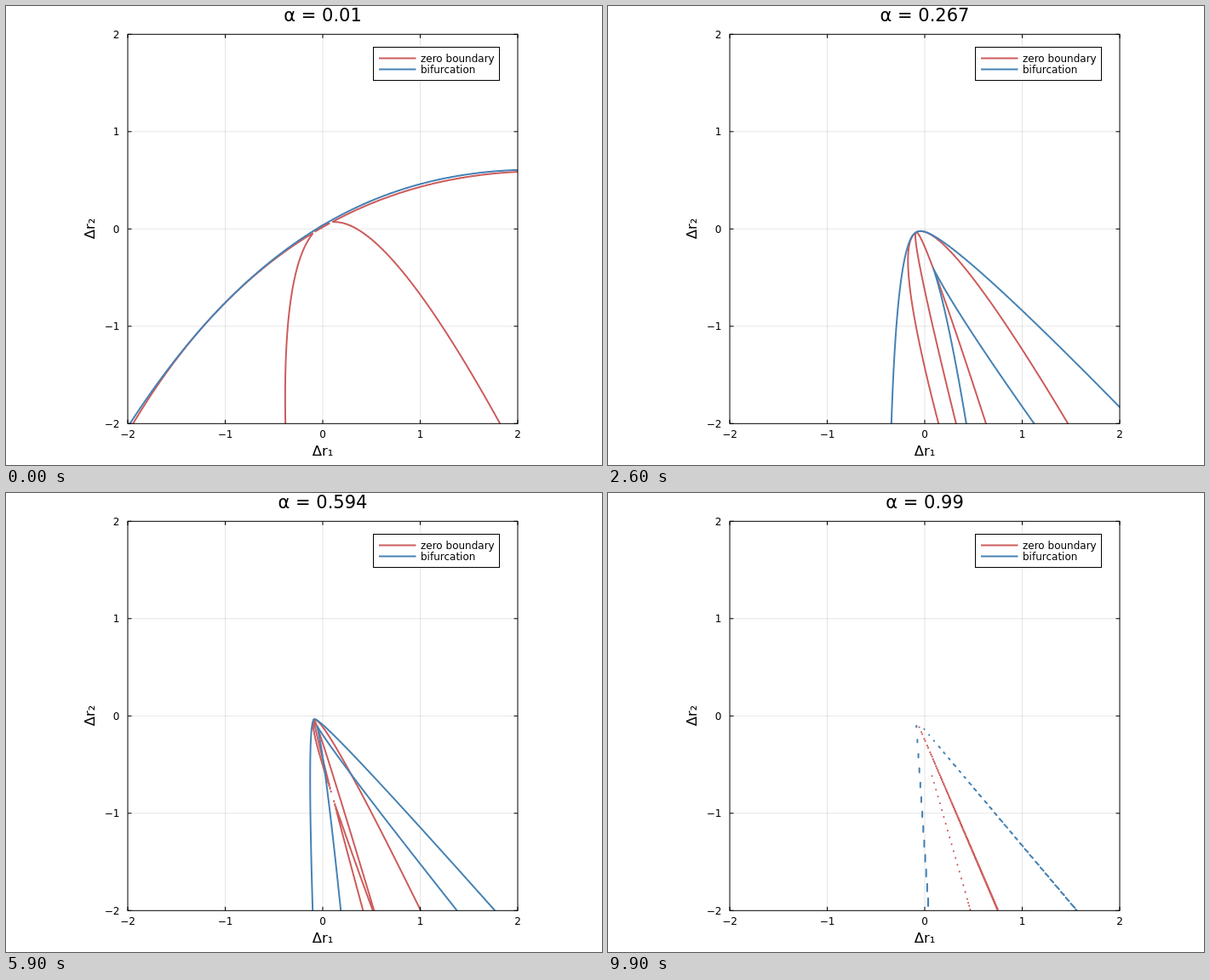
An HTML page with a canvas for the animation above (10000 ms loop, 700x540 px).

```html
<!DOCTYPE html>
<html lang="en">
<head>
<meta charset="utf-8">
<title>Bifurcation diagram</title>
<style>
html, body { margin: 0; width: 700px; height: 540px; overflow: hidden; background: #fff; }
canvas { display: block; }
</style>
</head>
<body>
<canvas id="plot" width="700" height="540"></canvas>
<script>
const ctx = document.getElementById('plot').getContext('2d');
const RED = '#cd5c5c', BLUE = '#4682b4';
const FRAMES = 100, STEP = 100;

// Plot area: data range -2..2 on both axes
const LEFT = 143, TOP = 33.3, SIZE = 458, UNIT = SIZE / 4;
const px = x => LEFT + (x + 2) * UNIT;
const py = y => TOP + (2 - y) * UNIT;

// Quadratic map: (x, y) = base + sigma * A u + B u^2, one parabola per variable
const base = { x: -0.09, y: -0.035 };
const wide = { ax: 0.2646, ay: 0.1601, b: 0.4285 };
const slim = { ax: 0.0586, ay: 0.0655, b: 0.285 };
const RAY1 = 0.0666, RAY2 = 0.84;   // slopes of the limiting fold rays

// Coefficients of the map in fold coordinates
const fold = (() => {
  const m1 = Math.sqrt(wide.b - RAY1), m2 = -Math.sqrt(slim.b - RAY1);
  const n1 = Math.sqrt(RAY2 - wide.b), n2 = Math.sqrt(RAY2 - slim.b);
  const det = m1 * n2 - m2 * n1;
  const lin1 = c => c.ax + RAY1 * c.ay;
  const lin2 = c => -(c.ax + RAY2 * c.ay);
  const a1 = (n2 * lin1(wide) - n1 * lin1(slim)) / det;
  const b1 = (m1 * lin1(slim) - m2 * lin1(wide)) / det;
  const a2 = (n2 * lin2(wide) - n1 * lin2(slim)) / det;
  const b2 = (m1 * lin2(slim) - m2 * lin2(wide)) / det;
  return {
    g: b1, h: a2,
    k1: -a1 * a1 / 4 - b1 * b2 / 2,
    k2: -b2 * b2 / 4 - a1 * a2 / 2
  };
})();

function parabola(c, s) {
  const k = c.ax + c.b * c.ay;
  return (dx, dy) => {
    const w = dx + c.b * dy;
    return k * k * s * dy - c.ay * k * s * w + w * w;
  };
}

function zeroField(s) {
  const f = parabola(wide, s), g = parabola(slim, s);
  return (dx, dy) => f(dx, dy) * g(dx, dy);
}

// Discriminant of the quartic for the equilibria
function foldField(s) {
  const gg = fold.g * fold.g * s, hh = fold.h * fold.h * s;
  const tail = 27 * gg * gg * hh * hh;
  return (dx, dy) => {
    const l1 = dx + RAY1 * dy - fold.k1 * s;
    const l2 = -RAY2 * dy - dx - fold.k2 * s;
    const p = -2 * l1, r = l1 * l1 - gg * l2;
    return 256 * r * l2 * l2 + hh * p * (144 * r - 4 * p * p) - tail;
  };
}

// Zero contour on a regular grid
const N = 400, H = 4 / (N - 1);
const grid = new Float64Array(N * N);

function contour(field, color) {
  for (let j = 0; j < N; j++)
    for (let i = 0; i < N; i++)
      grid[j * N + i] = field(-2 + i * H - base.x, -2 + j * H - base.y);

  ctx.beginPath();
  for (let j = 0; j < N - 1; j++) {
    for (let i = 0; i < N - 1; i++) {
      const o = j * N + i;
      const a = grid[o], b = grid[o + 1], c = grid[o + N + 1], d = grid[o + N];
      const pa = a > 0, pb = b > 0, pc = c > 0, pd = d > 0;
      if (pa === pb && pb === pc && pc === pd) continue;
      const pts = [];
      if (pa !== pb) pts.push([i + a / (a - b), j]);
      if (pb !== pc) pts.push([i + 1, j + b / (b - c)]);
      if (pc !== pd) pts.push([i + d / (d - c), j + 1]);
      if (pd !== pa) pts.push([i, j + a / (a - d)]);
      if (pts.length === 4 && (a + b + c + d > 0) !== pa) pts.unshift(pts.pop());
      pts.forEach(([u, v], n) => {
        const x = px(-2 + u * H), y = py(-2 + v * H);
        if (n % 2) ctx.lineTo(x, y); else ctx.moveTo(x, y);
      });
    }
  }
  ctx.strokeStyle = color;
  ctx.lineWidth = 2;
  ctx.lineCap = ctx.lineJoin = 'round';
  ctx.stroke();
}

function line(x1, y1, x2, y2, color, width) {
  ctx.strokeStyle = color;
  ctx.lineWidth = width;
  ctx.lineCap = 'butt';
  ctx.beginPath();
  ctx.moveTo(x1, y1);
  ctx.lineTo(x2, y2);
  ctx.stroke();
}

function text(str, x, y, size, align) {
  ctx.font = size + 'px "DejaVu Sans", sans-serif';
  ctx.textAlign = align;
  ctx.fillStyle = '#000';
  ctx.fillText(str, x, y);
}

function drawGrid() {
  for (let v = -1; v <= 1; v++) {
    line(px(v), TOP, px(v), TOP + SIZE, 'rgba(0,0,0,.1)', 1);
    line(LEFT, py(v), LEFT + SIZE, py(v), 'rgba(0,0,0,.1)', 1);
  }
}

function drawAxes() {
  const right = LEFT + SIZE, bottom = TOP + SIZE, tick = 4.5;
  ctx.lineJoin = 'miter';
  ctx.strokeStyle = '#000';
  ctx.lineWidth = 1;
  ctx.strokeRect(LEFT, TOP, SIZE, SIZE);
  for (let v = -2; v <= 2; v++) {
    const x = px(v), y = py(v), label = String(v).replace('-', '\u2212');
    line(x, bottom, x, bottom - tick, '#000', 1);
    line(x, TOP, x, TOP + tick, '#000', 1);
    line(LEFT, y, LEFT + tick, y, '#000', 1);
    line(right, y, right - tick, y, '#000', 1);
    text(label, x, 508, 12, 'center');
    text(label, 133.5, y + 4.4, 12, 'right');
  }
  text('Δr₁', 372, 529, 16.5, 'center');
  ctx.save();
  ctx.translate(103.5, 262);
  ctx.rotate(-Math.PI / 2);
  text('Δr₂', 0, 0, 16.5, 'center');
  ctx.restore();
}

function drawLegend() {
  ctx.fillStyle = '#fff';
  ctx.fillRect(431.5, 48.5, 148, 39);
  ctx.strokeStyle = '#000';
  ctx.lineWidth = 1;
  ctx.strokeRect(431.5, 48.5, 148, 39);
  line(438, 61.5, 481.5, 61.5, RED, 2);
  line(438, 74.5, 481.5, 74.5, BLUE, 2);
  text('zero boundary', 487, 66, 12, 'left');
  text('bifurcation', 487, 79, 12, 'left');
}

function draw(frame) {
  const alpha = 0.01 + 0.98 * frame / (FRAMES - 1);
  const s = (1 - alpha) ** 2 / alpha;
  ctx.fillStyle = '#fff';
  ctx.fillRect(0, 0, 700, 540);
  drawGrid();
  ctx.save();
  ctx.beginPath();
  ctx.rect(LEFT, TOP, SIZE, SIZE);
  ctx.clip();
  contour(zeroField(s), RED);
  contour(foldField(s), BLUE);
  ctx.restore();
  drawAxes();
  drawLegend();
  text('α = ' + Number(alpha.toFixed(3)), 372, 18.3, 21, 'center');
}

let shown = -1;
const start = performance.now();
function tick(now) {
  const frame = Math.floor(Math.max(0, now - start) / STEP) % FRAMES;
  if (frame !== shown) draw(shown = frame);
  requestAnimationFrame(tick);
}
draw(shown = 0);
requestAnimationFrame(tick);
</script>
</body>
</html>
```
